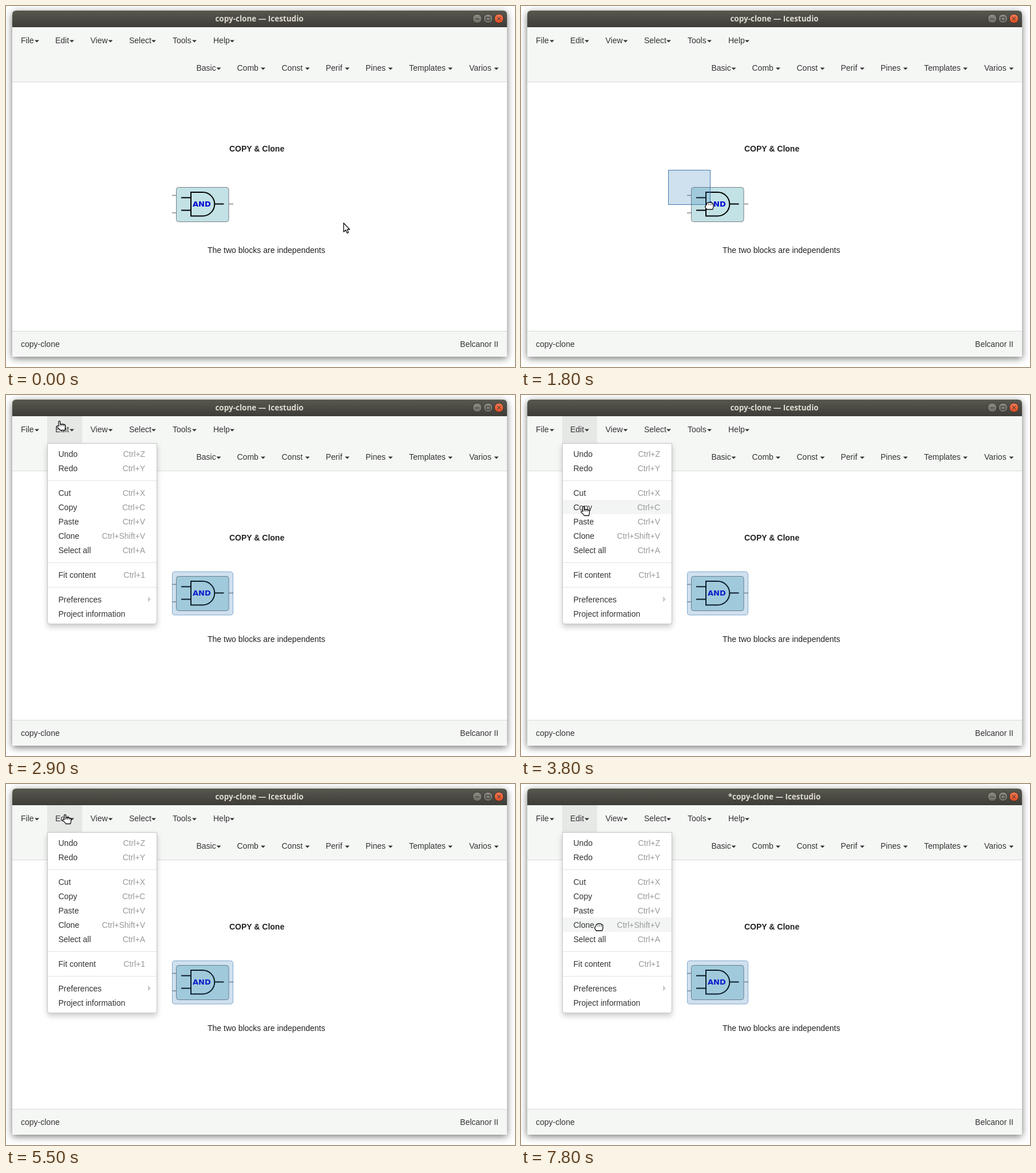
These frames come from a looping animation (889 by 630 pixels, 8000 ms). An HTML page:

```html
<!DOCTYPE html>
<html lang="en">
<head>
<meta charset="utf-8">
<title>copy-clone</title>
<style>
  html, body { margin: 0; width: 100%; height: 100%; overflow: hidden; background: #fff; }
  svg { position: absolute; left: 0; top: 0; display: block; }
  #shadow {
    position: absolute; left: 11px; top: 8px; width: 864px; height: 604px;
    border-radius: 7px 7px 0 0; box-shadow: 0 3px 13px rgba(0, 0, 0, .55);
  }
  text { font: 14px "Liberation Sans", Arial, sans-serif; fill: #333; white-space: pre; }
  .caption { font: bold 13.5px "Open Sans", "Noto Sans", sans-serif; fill: #dfdbd2; text-anchor: middle; }
  .bold { font-weight: bold; fill: #222; }
  .note { fill: #222; }
  .gate { font: bold 13px "DejaVu Sans", sans-serif; fill: #0000d0; }
  .end { text-anchor: end; }
  .key { text-anchor: end; fill: #999; }
  #menu .panel { filter: drop-shadow(0 5px 5px rgba(0, 0, 0, .2)); }
  #cursor path { fill: #fff; stroke: #111; stroke-width: 1.3; stroke-linejoin: round; stroke-linecap: round; }
  #cursor .ticks { fill: none; stroke-width: 1; }
</style>
</head>
<body>
<div id="shadow"></div>
<svg width="889" height="630" viewBox="0 0 889 630">
  <defs>
    <linearGradient id="bar" x2="0" y2="1">
      <stop stop-color="#59584f"/><stop offset="1" stop-color="#3d3c37"/>
    </linearGradient>
    <linearGradient id="grey" x2="0" y2="1">
      <stop stop-color="#8d8b82"/><stop offset="1" stop-color="#6c6b63"/>
    </linearGradient>
    <linearGradient id="red" x2="0" y2="1">
      <stop stop-color="#f27a55"/><stop offset="1" stop-color="#dd4a20"/>
    </linearGradient>
  </defs>

  <path d="M11 37V15Q11 8 18 8H868Q875 8 875 15V37Z" fill="url(#bar)"/>
  <text id="caption" class="caption" x="442.5" y="26.5"></text>
  <g stroke="#35342f">
    <circle cx="823" cy="22" r="8" fill="url(#grey)"/>
    <circle cx="842" cy="22" r="8" fill="url(#grey)"/>
    <circle cx="861" cy="22" r="8" fill="url(#red)"/>
    <path d="M819.5 22.5h7M838.5 19.5h7v6h-7zM858 19l6 6m0-6l-6 6" fill="none"/>
  </g>

  <path d="M11 37H875V612H11Z" fill="#fff"/>
  <path d="M11 37H875V132H11ZM11 568H875V612H11Z" fill="#f5f7f5"/>
  <path d="M11 132.5H875M11 567.5H875" stroke="#d8dad8"/>
  <rect id="editTab" x="72" y="37" width="61" height="48" fill="#e6e8e6"/>
  <g id="toolbar"></g>
  <text x="26" y="595">copy-clone</text>
  <text class="end" x="860" y="595">Belcanor II</text>

  <text class="bold" x="390" y="254">COPY &amp; Clone</text>
  <text class="note" x="352" y="431">The two blocks are independents</text>

  <path d="M290 330.5h8M290 361h8M389 345.5h8" stroke="#888" stroke-width="1.5"/>
  <rect x="297.5" y="316.5" width="91.5" height="60" rx="4" fill="#c2e2e6" stroke="#777f82"/>
  <path d="M323 325V366.5H343.5A20.8 20.75 0 0 0 343.5 325ZM306 334.5h17M306 356.5h17M364.5 345.5h16"
        fill="none" stroke="#000" stroke-width="2"/>
  <text class="gate" x="326" y="350">AND</text>

  <g fill="#337ab7" fill-opacity=".23" stroke="#3f78b0">
    <rect id="selection" x="290.5" y="308.5" width="106" height="75.5" rx="4" stroke-dasharray="1.5 1"/>
    <rect id="band" x="257.5" y="286.5"/>
  </g>

  <g id="menu">
    <path class="panel" d="M72.5 84.5H263.5V395.5Q263.5 399.5 259.5 399.5H76.5Q72.5 399.5 72.5 395.5Z"
          fill="#fff" stroke="#c4c4c4"/>
    <rect id="rowHover" x="73" width="190" height="25" fill="#f3f5f4"/>
    <path d="M73 149.5H263M73 292.5H263M73 335.5H263" stroke="#e3e3e3"/>
    <path d="M248 351.5l5 5-5 5z" fill="#ccc"/>
    <g id="items"></g>
  </g>

  <g id="cursor">
    <path id="arrow" d="M.7.8V16.2L4.3 12.9 6.8 18.3 9.2 17.2 6.8 12H11.3Z"/>
    <g id="pointer">
      <path d="M-1.2 9.5V2Q-1.2.5.2.5T1.6 2V6H7.5Q10.5 6.4 10.5 8.8V12Q10.5 14 9.5 16.5H1.5Q0 13.5-4 10.8-4.6 8.4-2.4 8.6Z"/>
      <path class="ticks" d="M1.6 6v3M4.6 6.5v2.5M7.6 6.7v2.3"/>
    </g>
    <g id="fist">
      <path d="M-5.5 8L-8 4.6Q-9 2-6-.2L-5.4-2.5Q-4.5-4.4-2.6-3.4-1.3-5.4.5-3.8 2-4.8 3.3-3 5.6-3.2 6-.5V4.2L4.6 8Z"/>
      <path class="ticks" d="M-2.6-1.2v1.4M.4-1.2v1.4M3.3-.9v1.3"/>
    </g>
  </g>
</svg>

<script>
const $ = id => document.getElementById(id);
const show = (id, visible) => $(id).style.display = visible ? "" : "none";

// Label, text x, caret x
const caret = (x, y) => `<path d="M${x} ${y}h8l-4 4z" fill="#333"/>`;
const menuRow = (baseline, labels) => labels.map(([label, x, caretX]) =>
  `<text x="${x}" y="${baseline}">${label}</text>` + caret(caretX, baseline - 5.5)).join("");

$("toolbar").innerHTML =
  menuRow(65, [["File", 26, 50], ["Edit", 86, 111], ["View", 147.5, 178.5],
    ["Select", 215, 254], ["Tools", 291, 325], ["Help", 362, 391]]) +
  menuRow(113, [["Basic", 332.5, 367.5], ["Comb", 403.5, 445], ["Const", 481.5, 522.5],
    ["Perif", 558.5, 592], ["Pines", 628, 667.5], ["Templates", 704, 772], ["Varios", 809, 852.5]]);

// Label, shortcut, row centre
const items = [
  ["Undo", "Ctrl+Z", 102.5], ["Redo", "Ctrl+Y", 127.5],
  ["Cut", "Ctrl+X", 170.5], ["Copy", "Ctrl+C", 195.5], ["Paste", "Ctrl+V", 220.5],
  ["Clone", "Ctrl+Shift+V", 245.5], ["Select all", "Ctrl+A", 270.5],
  ["Fit content", "Ctrl+1", 313.5],
  ["Preferences", "", 356.5], ["Project information", "", 381.5]
];
$("items").innerHTML = items.map(([label, key, y]) =>
  `<text x="91.5" y="${y + 5}">${label}</text><text class="key" x="243" y="${y + 5}">${key}</text>`).join("");

// Pointer path: time, x, y
const path = [
  [200, 589, 378], [900, 277, 293], [1000, 277, 293], [1300, 257, 286],
  [1800, 330, 347], [1900, 330, 347], [2000, 336, 350], [2200, 336, 350],
  [2900, 93, 45], [3000, 93, 45], [3600, 109, 203], [3900, 109, 191],
  [4300, 109, 191], [4400, 109, 190], [4600, 109, 190], [4700, 102, 145],
  [5200, 103, 53], [5600, 103, 53], [6200, 109, 249], [6600, 109, 249],
  [6900, 133, 247], [7400, 133, 247], [7500, 137, 248]
];

function pointerAt(t) {
  const next = path.findIndex(p => p[0] >= t);
  if (next < 1) return path.at(next).slice(1);
  const [t0, x0, y0] = path[next - 1], [t1, x1, y1] = path[next];
  const u = (t - t0) / (t1 - t0), k = u * u * (3 - 2 * u);
  return [Math.round(x0 + (x1 - x0) * k), Math.round(y0 + (y1 - y0) * k)];
}

const within = (t, from, to) => t >= from && t < to;

function draw(time) {
  const t = Math.floor(time % 8000 / 100) * 100;
  const [x, y] = pointerAt(t);
  const open = within(t, 2900, 4400) || t >= 5500;
  const dragging = within(t, 1400, 1900);

  $("caption").textContent = (t >= 7700 ? "*" : "") + "copy-clone — Icestudio";
  show("editTab", open);
  show("menu", open);
  show("selection", t >= 1900);
  show("band", dragging);
  if (dragging) {
    $("band").setAttribute("width", x - 257);
    $("band").setAttribute("height", y - 287 > 0 ? y - 287 : 0);
  }

  const row = items.find(item => Math.abs(y - item[2]) <= 12.5);
  show("rowHover", row);
  if (row) $("rowHover").setAttribute("y", row[2] - 12.5);

  const overBlock = within(t, 1400, 2000) && x > 297 && y > 316;
  const overEdit = x > 72 && x < 133 && y > 37 && y < 85;
  const kind = overBlock || within(t, 4300, 4400) || t >= 7700 ? "fist"
    : overEdit || open ? "pointer" : "arrow";
  for (const id of ["arrow", "pointer", "fist"]) show(id, id === kind);
  $("cursor").setAttribute("transform", `translate(${x} ${y})`);
}

const start = performance.now();
function tick() {
  draw(performance.now() - start);
  requestAnimationFrame(tick);
}
tick();
</script>
</body>
</html>
```
